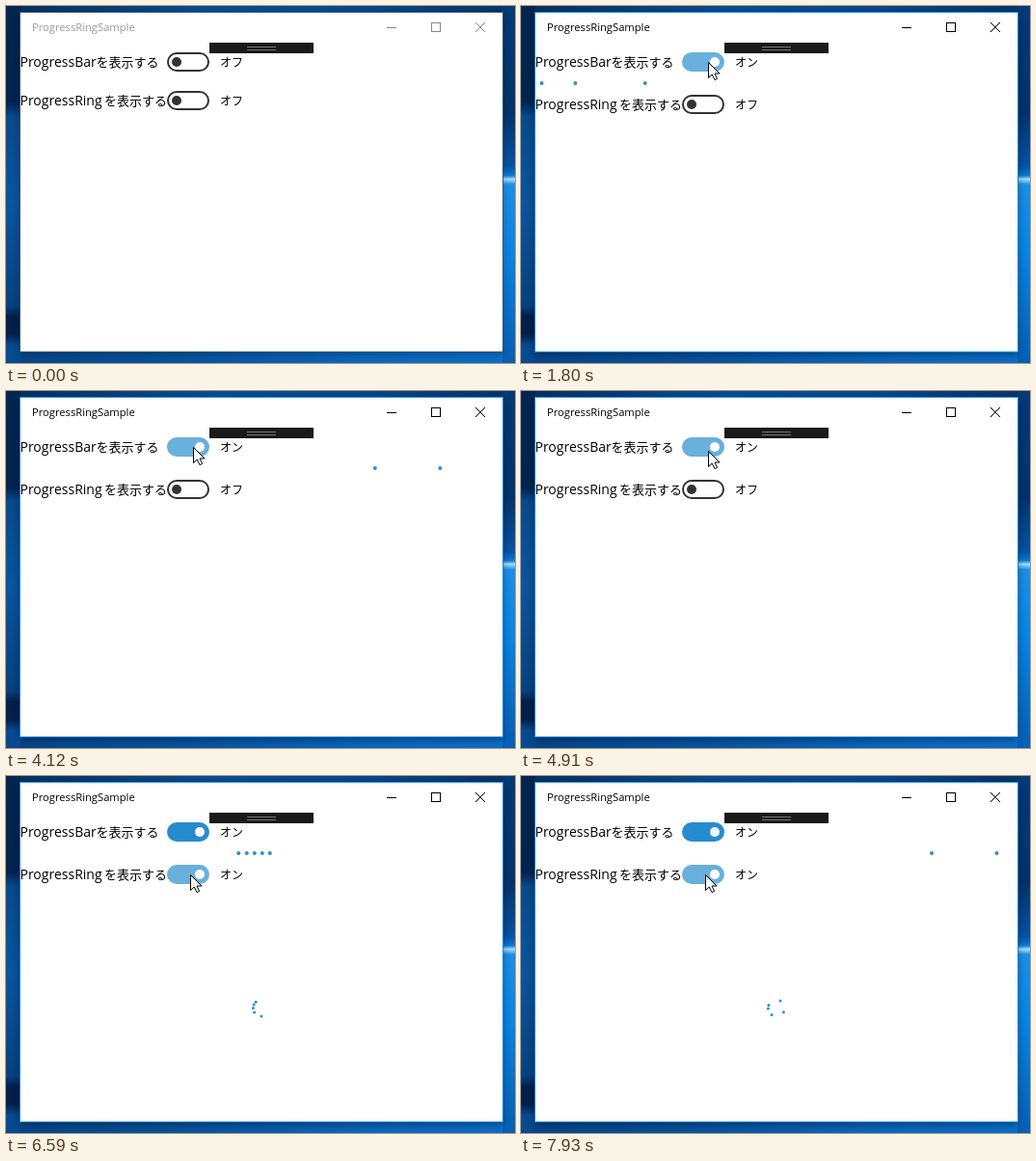
These frames come from a looping animation (528x370 px, 8000 ms). An HTML page:

```html
<!DOCTYPE html>
<html lang="ja">
<head>
<meta charset="utf-8">
<style>
  html, body { margin: 0; width: 528px; height: 370px; overflow: hidden; }
  svg { display: block; }
  text { font-family: "Open Sans", "Noto Sans", sans-serif; font-size: 14px; white-space: pre; }
  text.jp { font-family: "Noto Sans CJK JP", "Noto Sans CJK", sans-serif; font-size: 13px; }
  text.title { font-size: 11.2px; }
</style>
</head>
<body>
<svg width="528" height="370" viewBox="0 0 528 370">
  <defs>
    <linearGradient id="left" x2="0" y2="1">
      <stop offset="0" stop-color="#04254f"/><stop offset=".27" stop-color="#032450"/>
      <stop offset=".31" stop-color="#084a8c"/><stop offset=".55" stop-color="#0a559f"/>
      <stop offset=".84" stop-color="#07417f"/><stop offset=".87" stop-color="#03204a"/>
      <stop offset=".92" stop-color="#03204a"/><stop offset=".95" stop-color="#084a90"/>
    </linearGradient>
    <linearGradient id="right" x2="0" y2="1">
      <stop offset="0" stop-color="#053a76"/><stop offset=".3" stop-color="#03336c"/>
      <stop offset=".45" stop-color="#0654a4"/><stop offset=".475" stop-color="#0c7ad6"/>
      <stop offset=".485" stop-color="#a5e0ff"/><stop offset=".5" stop-color="#1c8fe8"/>
      <stop offset=".7" stop-color="#0a83e2"/><stop offset="1" stop-color="#075fb4"/>
    </linearGradient>
    <linearGradient id="top">
      <stop offset="0" stop-color="#05305f"/><stop offset=".4" stop-color="#0a4d92"/>
      <stop offset=".7" stop-color="#08488c"/><stop offset="1" stop-color="#053468"/>
    </linearGradient>
    <linearGradient id="bottom">
      <stop offset="0" stop-color="#06468a"/><stop offset=".3" stop-color="#07529f"/>
      <stop offset=".7" stop-color="#0a68c0"/><stop offset="1" stop-color="#0b70cc"/>
    </linearGradient>
    <filter id="soft" x="-10%" y="-10%" width="120%" height="120%"><feGaussianBlur stdDeviation="5"/></filter>
    <clipPath id="client"><rect x="15" y="31" width="500" height="327"/></clipPath>
  </defs>
  <rect width="528" height="370" fill="url(#bottom)"/>
  <rect width="528" height="8" fill="url(#top)"/>
  <rect width="15" height="370" fill="url(#left)"/>
  <rect x="515" width="13" height="370" fill="url(#right)"/>
  <rect id="shadow" x="15" y="10" width="500" height="351" filter="url(#soft)"/>
  <rect id="frame" x="14" y="6" width="502" height="353"/>
  <rect x="15" y="7" width="500" height="351" fill="#fff"/>

  <text id="title" class="title" x="27" y="26">ProgressRingSample</text>
  <g id="caption" fill="none" stroke-width="1">
    <path d="M395 22.5h10M441.5 17.5h9v9h-9z" shape-rendering="crispEdges"/>
    <path d="M487 17l10 10M497 17l-10 10"/>
  </g>

  <g id="rows"></g>
  <rect x="211" y="38" width="108" height="11" fill="#1b1a1a"/>
  <path d="M250 42.5h30M250 45.5h30" stroke="#777"/>
  <g id="dots" fill="#2b8fcd" clip-path="url(#client)"></g>
  <path id="cursor" d="M.5 .5V16.5L4.2 13L7 18.6L9.6 17.4L7 12H12z" fill="#fff" stroke="#000"/>
</svg>
<script>
const LOOP = 8000, DOTS = 5, STAGGER = 0.167;
const ACTIVATE = 1200;
const barRuns = [
  { start: 1459, rate: 1.1 },
  { start: 5102, rate: 1.072 }
];
const ringRun = { start: 5834, rate: 1.072 };
const ringCenter = { x: 265, y: 240.5, r: 8.6 };

// seconds, degrees
const ringPath = [[0, -110], [.142, -46], [.309, 7], [.476, 32], [.643, 50], [.81, 67], [1.2, 93],
  [1.4, 114], [1.58, 162], [1.746, 248], [1.912, 336], [2.079, 383], [2.246, 400], [2.6, 425]];

const $ = id => document.getElementById(id);
const clamp = v => Math.max(0, Math.min(1, v));
const progress = (t, from, to) => clamp((t - from) / (to - from));
const easeInOut = p => p * p * (3 - 2 * p);
const elapsed = (run, t) => (t - run.start) / 1000 * run.rate;

function make(tag, attrs, parent, content = '') {
  const el = document.createElementNS('http://www.w3.org/2000/svg', tag);
  set(el, attrs);
  el.textContent = content;
  return parent.appendChild(el);
}
function set(el, attrs) {
  for (const name in attrs) el.setAttribute(name, attrs[name]);
}

function makeRow(latin, jpX, press, release) {
  const g = make('g', {}, $('rows'));
  make('text', { x: 14.5, y: 63 }, g, latin);
  make('text', { x: jpX, y: 63, class: 'jp' }, g, 'を表示する');
  return {
    g, press, release,
    track: make('rect', { x: 168, y: 49, width: 42, height: 18, rx: 9, 'stroke-width': 2 }, g),
    knob: make('circle', { cy: 58, r: 5 }, g),
    state: make('text', { x: 222, y: 63, class: 'jp', style: 'font-size:12px' }, g)
  };
}
const rows = [
  makeRow('ProgressBar', 93.5, 1280, 1400),
  makeRow('ProgressRing', 102, 5720, 5830)
];
const makeDots = r => Array.from({ length: DOTS }, () => make('circle', { r }, $('dots')));
const barDots = makeDots(2);
const ringDots = makeDots(1.5);

function drawRow(row, t, y, cursor) {
  const on = t >= row.release;
  const pressed = t >= row.press && !on;
  const hover = cursor.visible && Math.abs(cursor.y - y - 58) <= 10 && cursor.x < 211;
  const color = on ? (hover ? '#69b0dc' : '#278ccf') : pressed ? '#999' : hover ? '#000' : '#333';
  set(row.g, { transform: `translate(0 ${y})` });
  set(row.track, { stroke: color, fill: on || pressed ? color : '#fff' });
  set(row.knob, {
    cx: 177 + 24 * easeInOut(progress(t, row.release, row.release + 120)),
    fill: on || pressed ? '#fff' : color
  });
  row.state.textContent = on ? 'オン' : 'オフ';
}

// Cubic spline (.367,0) (.24,1)
function settle(x) {
  let lo = 0, hi = 1;
  for (let i = 0; i < 20; i++) {
    const s = (lo + hi) / 2, q = 1 - s;
    if (1.101 * s * q * q + 0.72 * s * s * q + s ** 3 < x) lo = s; else hi = s;
  }
  return easeInOut(lo);
}
function leave(s) {
  if (s <= 0) return 0;
  return s < .16 ? 356 * s * s / .32 : 356 * (s - .08);
}

function drawBar(t) {
  const u = elapsed(t < 5000 ? barRuns[0] : barRuns[1], t);
  barDots.forEach((dot, k) => {
    const s = u - STAGGER * k;
    const x = 15 - 8 * k + 57.7 * u + 166.7 * settle(clamp(s)) + leave(s - 2);
    set(dot, { cx: x, cy: 80, visibility: s >= 0 && x < 518 ? 'visible' : 'hidden' });
  });
}

function ringAngle(s) {
  const last = ringPath.length - 1;
  const at = i => ringPath[Math.max(0, Math.min(last, i))];
  const slope = i => (at(i + 1)[1] - at(i - 1)[1]) / (at(i + 1)[0] - at(i - 1)[0]);
  let i = 0;
  while (i < last - 1 && s > at(i + 1)[0]) i++;
  const [t0, a0] = at(i), [t1, a1] = at(i + 1), h = t1 - t0;
  const p = clamp((s - t0) / h), q = 1 - p;
  return a0 * (1 + 2 * p) * q * q + a1 * p * p * (3 - 2 * p)
    + h * p * q * (slope(i) * q - slope(i + 1) * p);
}

function drawRing(t) {
  const u = elapsed(ringRun, t);
  ringDots.forEach((dot, k) => {
    const s = u - STAGGER * k;
    const a = (ringAngle(Math.max(0, s)) - 6 * k + 250) * Math.PI / 180;
    set(dot, {
      cx: ringCenter.x + ringCenter.r * Math.sin(a),
      cy: ringCenter.y - ringCenter.r * Math.cos(a),
      visibility: s >= 0 ? 'visible' : 'hidden'
    });
  });
}

function cursorAt(t) {
  const enter = 1 - (1 - progress(t, 150, 700)) ** 2;
  const move = easeInOut(progress(t, 4760, 5600));
  return {
    x: Math.round(207 - 13 * enter - 3 * move),
    y: Math.round(16 + 42 * enter + 44 * move),
    visible: t >= 170
  };
}

function render(t) {
  const active = t >= ACTIVATE;
  const cursor = cursorAt(t);
  set($('shadow'), { opacity: active ? .45 : .3 });
  set($('frame'), { fill: active ? '#1c8ae0' : '#3f566e' });
  set($('title'), { fill: active ? '#000' : '#999' });
  set($('caption'), { stroke: active ? '#000' : '#888' });
  drawRow(rows[0], t, 0, cursor);
  drawRow(rows[1], t, t >= rows[0].release ? 44 : 40, cursor);
  drawBar(t);
  drawRing(t);
  set($('cursor'), {
    transform: `translate(${cursor.x} ${cursor.y})`,
    visibility: cursor.visible ? 'visible' : 'hidden'
  });
}

const begin = performance.now();
function tick() {
  render((performance.now() - begin) % LOOP);
  requestAnimationFrame(tick);
}
tick();
</script>
</body>
</html>
```
